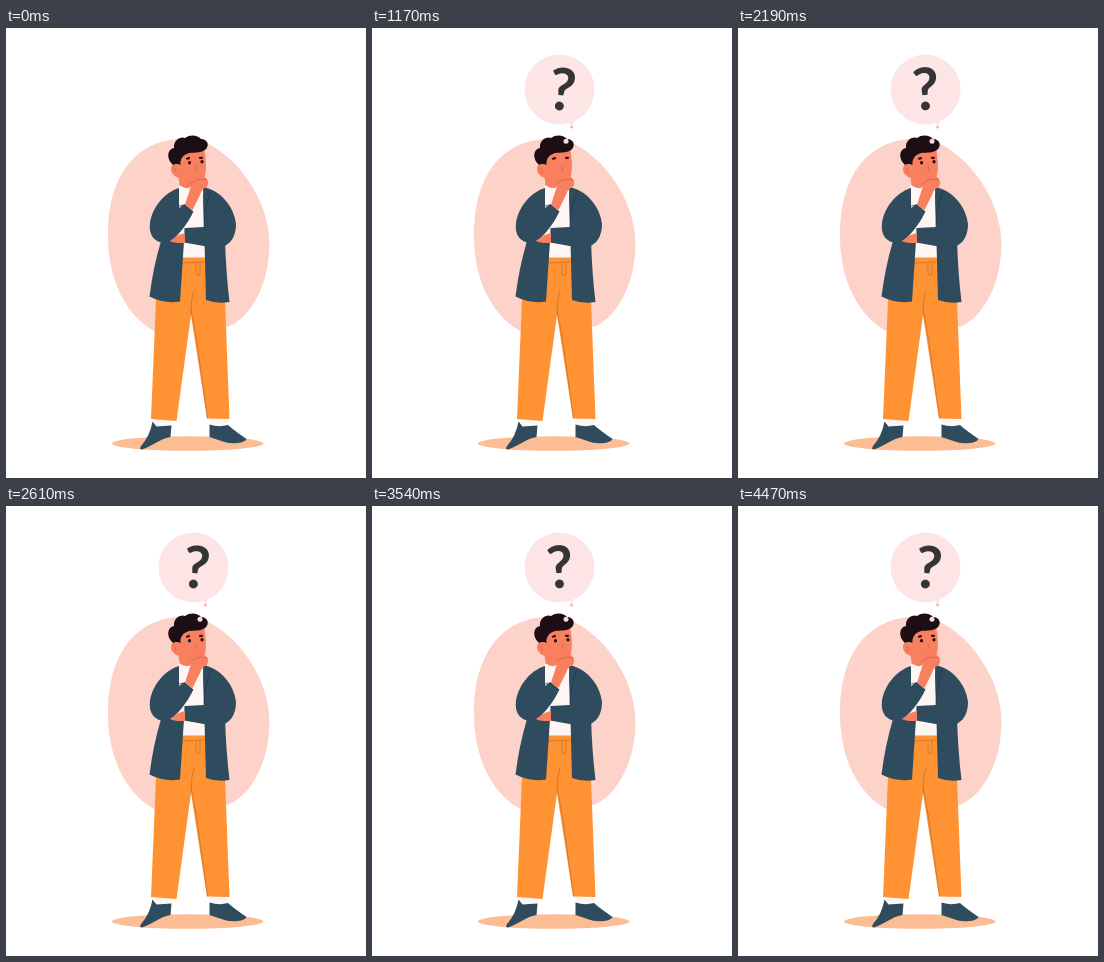
Animation, 360 px wide and 450 px high, one loop 4.5 s. Source, as an HTML page:

```html
<!DOCTYPE html>
<html lang="en">
<head>
<meta charset="utf-8">
<title>Thinking man</title>
<style>
html, body { margin: 0; width: 100%; height: 100%; overflow: hidden; background: #fff; }
svg { display: block; width: 100vw; height: 100vh; }
.jacket { fill: #2f4b5e; }
.skin { fill: #f9805f; }
.pants { fill: #ff9233; }
.hair { fill: #1d0d15; }
.shirt { fill: #fdf6f5; }
.line { fill: none; stroke-linecap: round; stroke-linejoin: round; }
#mark { font: 700 58.500px Lato, sans-serif; text-anchor: middle; fill: #353437; }
</style>
</head>
<body>
<svg viewBox="0 0 360 450">
  <path fill="#fdd2c9" d="M180 110.500C218 110.500 263.500 165 263.500 215C263.500 254 247 288 222 299L186 286L148 303C118 286 102 249 102 208C102 147 130 110.500 180 110.500Z"/>
  <ellipse cx="181.700" cy="415.500" rx="75.700" ry="7.300" fill="#fdbd94"/>

  <g class="shirt">
    <path d="M149 391H166L165 400L150 400Z"/>
    <path d="M203 390H222L221 399H204Z"/>
    <path d="M172.500 158L198 157L200 232H174Z"/>
  </g>
  <g class="jacket">
    <path d="M146.500 393.500L150.500 398.500L165.500 397.500L164.500 409C153 411 147 418 136 421.500Q133 421.500 135 418Q144 408 146.500 393.500Z"/>
    <path d="M203.500 396.500Q213 399.500 222 397C227 402 234 406 240.500 411Q239 414 232 415Q222 416 217 413.500L203.500 409Z"/>
  </g>

  <path class="pants" d="M175 229.500H199L219 272L223.500 391L201 390.500L185 287L170.500 393L145 391L150 271Z"/>
  <g class="line" stroke="#c0702f" stroke-width=".7">
    <path d="M176 235L198 234M190 236V245Q191 249 194 247V235"/>
    <path d="M185.500 286Q184 276 188 262M185 281Q191 310 194 336L201.500 390"/>
  </g>

  <g class="jacket">
    <path d="M155 213L178 213L174 273.500Q158 276 143.500 268.500Q147 240 155 213Z"/>
    <path d="M197 165L219 212Q220 245 223.500 274Q211 276 200 272L198.500 214Z"/>
    <path d="M197 159C214 162 228 178 230 196C230 211 222 220 209 220L178 214.500L178.500 200L198 199Z"/>
  </g>
  <path class="skin" d="M179 205Q172 206 164 213Q168 215.500 179 215Z"/>
  <path class="skin" d="M172 145L173.500 157Q180 163 186 158V148Z"/>
  <path class="jacket" d="M173 160C157 165 146 181 144 195C142 209 151 216 161 214.500C171 210 181 197 187.500 183.500L178.500 176L173 180Z"/>
  <path class="line" stroke="#213746" stroke-width=".7" d="M173 178Q177 176 180 178M205 163Q198 181 198 199"/>

  <g class="skin">
    <path d="M172 126L198 120C200 131 201 142 198 151C193 159 182 158 174 150Z"/>
    <path d="M173 137C167 134 163 139 166 145Q169 150 175 150Z"/>
    <path d="M179 177Q183 164 186 155Q193 145 199 149Q204 153 201 159Q196 160 194 167L186.500 182Z"/>
  </g>
  <path class="line" stroke="#d9604a" stroke-width=".8" d="M184 156Q189 151 195 151L201 152M190 138Q192 141 190 143M168 140Q170 141 170 145"/>
  <path class="hair" d="M167 137C160 131 161 121 168 120C167 112 175 108 179 110C184 106 192 107 195 111C202 111 204 118 199 122C193 126 187 124 183 125C176 127 174 132 174.500 137Q170 135 167 137Z"/>
  <path class="line" stroke="#2a1118" stroke-width="2.200" d="M181 130.700L183 130.100M194 129.800L196 129.800"/>
  <g class="hair">
    <ellipse class="eye" cx="183.500" cy="134.800" rx="1.600"/>
    <ellipse class="eye" cx="196" cy="133.800" rx="1.600"/>
  </g>

  <circle id="dotA" cx="194" cy="113.300" fill="#fbdcd9"/>
  <circle id="dotB" cx="199.600" cy="99" fill="#f5b3ab"/>
  <g fill="#fce5e4">
    <path id="tail"/>
    <circle id="bubble"/>
  </g>
  <text id="mark" x="188.800" y="82">?</text>
</svg>
<script>
const LOOP = 4500, SWING = 1840, PEAK = 1130, BLINKS = [1170, 3030];
const el = id => document.getElementById(id);
const eyes = document.querySelectorAll('.eye');
const clamp = (v, lo, hi) => Math.min(hi, Math.max(lo, v));
const ease = (t, from, to) => {
  const u = clamp((t - from) / (to - from), 0, 1);
  return u * u * (3 - 2 * u);
};
const mix = (a, b, u) => a + (b - a) * u;

function blink(t) {
  const gap = Math.min(...BLINKS.map(b => Math.abs(t - b)));
  const open = ease(gap, 30, 120);
  eyes.forEach(e => e.setAttribute('ry', 1.8 * open));
}

function thought(t) {
  el('dotA').setAttribute('r', 2.5 * ease(t, 560, 640));
  el('dotB').setAttribute('r', 1.5 * ease(t, 600, 690));

  const grow = ease(t, 622, 1090);
  const x = mix(204, 187.5, grow), y = mix(82, 61.5, grow), r = 35 * grow;
  const bubble = el('bubble');
  bubble.setAttribute('cx', x);
  bubble.setAttribute('cy', y);
  bubble.setAttribute('r', r);
  const half = Math.min(3, r * 0.4), base = y + r * 0.8;
  el('tail').setAttribute('d', grow ? `M${200 - half} ${base}H${200 + half}L200.500 97H198.500Z` : '');
}

function question(t) {
  const wave = clamp(2.5 * Math.cos((t - PEAK) / SWING * 2 * Math.PI), -1, 1);
  const angle = 1 + 5 * Math.sin(wave * Math.PI / 2);
  const size = ease(t, 770, 1100);
  el('mark').setAttribute('transform',
    `rotate(${angle} 187.5 78) translate(187.5 61.5) scale(${size}) translate(-187.5 -61.5)`);
}

function draw(now) {
  const t = now % LOOP;
  blink(t);
  thought(t);
  question(t);
}

let start;
function tick(now) {
  start ??= now;
  draw(now - start);
  requestAnimationFrame(tick);
}
draw(0);
requestAnimationFrame(tick);
</script>
</body>
</html>
```
